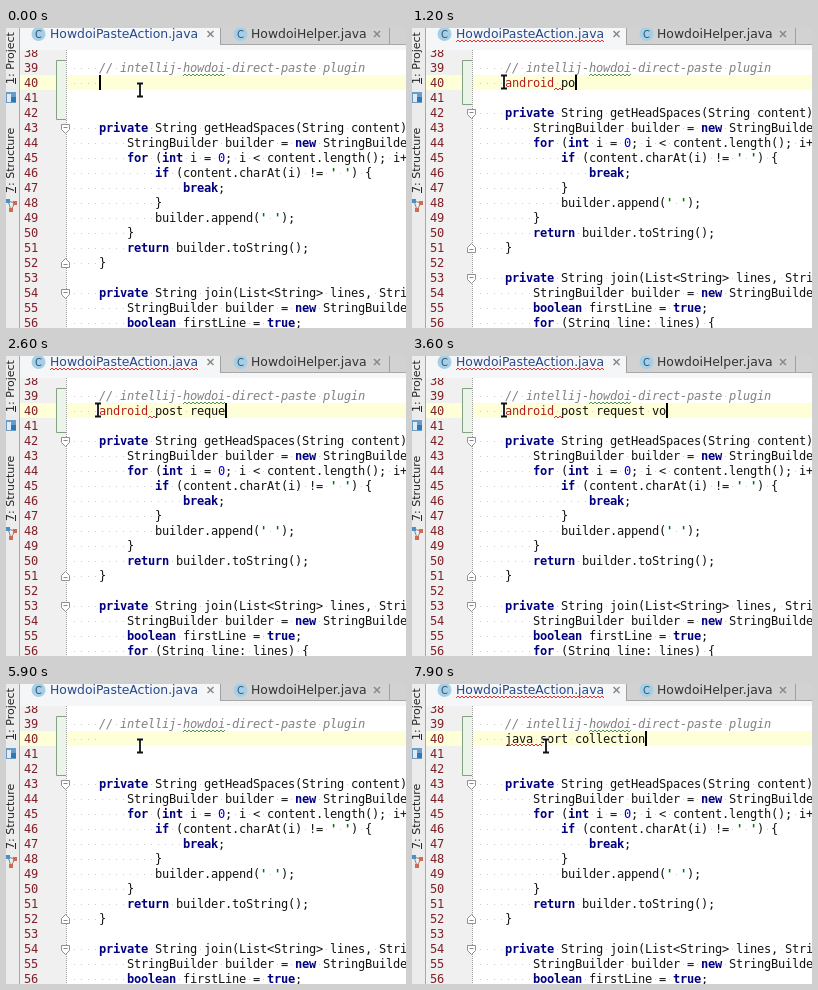
These frames come from a looping animation (400x300 px, 8 s). An HTML page with a canvas:

```html
<!DOCTYPE html>
<html lang="en">
<head>
<meta charset="utf-8">
<title>Editor paste demo</title>
<style>
html, body { margin: 0; width: 100%; height: 100%; overflow: hidden; background: #fff; }
canvas { display: block; }
</style>
</head>
<body>
<canvas id="stage" width="400" height="300"></canvas>
<script>
const ctx = document.getElementById('stage').getContext('2d');
const LOOP = 8000, LEFT = 65, CELL = 7, ROW = 15, FIRST = 38;
const MONO = '12px "DejaVu Sans Mono", monospace';
const SANS = '"DejaVu Sans", sans-serif';
const COMMENT = '    // intellij-howdoi-direct-paste plugin';

const methods = `    private String getHeadSpaces(String content) {
        StringBuilder builder = new StringBuilder();
        for (int i = 0; i < content.length(); i++) {
            if (content.charAt(i) != ' ') {
                break;
            }
            builder.append(' ');
        }
        return builder.toString();
    }

    private String join(List<String> lines, String glue) {
        StringBuilder builder = new StringBuilder();
        boolean firstLine = true;
        for (String line: lines) {`.split('\n');

const pasted = `    public class LoginRequest extends Request<String> {

        // ... other methods go here

        private Map<String, String> mParams;

        public LoginRequest(String param1, String param2) {
            super(Method.POST, "http://test.url", listener);
            mListener = listener;
            mParams.put("paramOne", param1);
            mParams.put("paramTwo", param2);

        }

        @Override
        public Map<String, String> getParams() {
            return mParams;`.split('\n');

const TOKEN = /\/\/.*|"[^"]*"|'[^']*'|\w+|[^\s\w"'\/]+|\S/g;
const KEYWORD = /^(private|public|class|extends|new|for|int|if|break|return|boolean|true|super)$/;

const colX = col => LEFT + col * CELL;
const rowMid = n => 25 + (n - FIRST) * ROW;

function box(x, y, w, h, color) {
  ctx.fillStyle = color;
  ctx.fillRect(x, y, w, h);
}

function label(text, x, y, color, font) {
  ctx.font = font;
  ctx.fillStyle = color;
  ctx.fillText(text, x, y);
}

function path(points, color, width = 1, fill) {
  ctx.beginPath();
  points.forEach(([x, y]) => ctx.lineTo(x, y));
  if (fill) { ctx.closePath(); ctx.fillStyle = fill; ctx.fill(); }
  ctx.strokeStyle = color;
  ctx.lineWidth = width;
  ctx.stroke();
}

function squiggle(x1, x2, y, color) {
  const points = [];
  for (let x = x1, i = 0; x <= x2; x += 2, i++) points.push([x, y + (i % 2 ? -1 : 1)]);
  path(points, color);
}

function mono(text, x, y, color, style = '') {
  ctx.letterSpacing = '-0.224px';
  label(text, x, y, color, style + MONO);
  ctx.letterSpacing = '0px';
}

function look(token) {
  if (token.startsWith('//')) return ['#808080', 'italic '];
  if (/^["']/.test(token)) return ['#007a00', 'bold '];
  if (KEYWORD.test(token)) return ['#000080', 'bold '];
  if (/^\d+$/.test(token)) return ['#0000d0'];
  if (token === 'android') return ['#b02020'];
  return ['#111'];
}

function codeLine(text, n) {
  const mid = rowMid(n);
  for (let i = 0; i < text.length; i++)
    if (text[i] === ' ') box(colX(i) + 3, mid, 1, 1, '#ccc');
  for (const m of text.matchAll(TOKEN))
    mono(m[0], colX(m.index), mid + 4, ...look(m[0]));
}

function foldMark(n, closing) {
  const y = rowMid(n) + .5, d = closing ? -1 : 1;
  path([[55.5, y - 4 * d], [63.5, y - 4 * d], [63.5, y + d], [59.5, y + 5 * d], [55.5, y + d], [55.5, y - 4 * d]],
    '#909090', 1, '#fff');
  path([[57.5, y - d], [61.5, y - d]], '#888');
}

function iBeam(x, y) {
  const shape = [[x - 3, y - 6.5], [x + 3, y - 6.5], [x, y - 6.5], [x, y + 6.5], [x - 3, y + 6.5], [x + 3, y + 6.5]];
  path(shape, '#fff', 4);
  path(shape, '#111', 1.8);
}

function cross(x) {
  path([[x - 3, 3], [x + 3, 9]], '#888', 1.5);
  path([[x + 3, 3], [x - 3, 9]], '#888', 1.5);
}

function classIcon(x) {
  ctx.beginPath();
  ctx.arc(x, 6, 7, 0, 7);
  ctx.fillStyle = '#a6cfe6';
  ctx.fill();
  label('C', x - 3.5, 10, '#2c5674', '10px ' + SANS);
}

function tabs(error) {
  box(14, 0, 386, 22, '#d2d2d2');
  box(14, 0, 200, 22, '#f4f6f8');
  box(214, 0, 1, 17, '#a0a0a0');
  box(383, 0, 1, 17, '#a0a0a0');
  box(214, 16, 186, 1, '#a8a8a8');
  box(14, 17, 386, 5, '#f4f6f8');
  const font = '12.4px ' + SANS;
  classIcon(32.5);
  label('HowdoiPasteAction.java', 44, 10, '#26488a', font);
  cross(204.5);
  classIcon(234.5);
  label('HowdoiHelper.java', 245, 10, '#333', font);
  cross(371);
  if (error) squiggle(44, 193, 13, '#e03030');
}

function sideLabel(text, bottom) {
  ctx.save();
  ctx.translate(8, bottom);
  ctx.rotate(-Math.PI / 2);
  label(text, 0, 0, '#222', '11px ' + SANS);
  box(0, 1, 6, 1, '#222');
  ctx.restore();
}

function sideBar() {
  box(0, 0, 13, 300, '#ececec');
  box(13, 0, 1, 300, '#a8a8a8');
  sideLabel('1: Project', 56);
  sideLabel('7: Structure', 165);
  box(0, 64, 10, 11, '#6a9cc8');
  box(1, 66, 4, 8, '#e4eaf0');
  box(5, 69, 5, 5, '#2c78b8');
  path([[2, 173], [9, 175], [5, 182], [2, 173]], '#888');
  for (const [x, y, color] of [[2, 173, '#4a90c4'], [9, 175, '#d06a50'], [5, 182, '#d06a50']])
    box(x - 2, y - 2, 4, 4, color);
}

// Number of typed characters, interpolated between [time, count] points.
function typed(points, t) {
  let count = 0;
  points.forEach(([t0, c0], i) => {
    if (t < t0) return;
    const [t1, c1] = points[i + 1] || [t0 + 1, c0];
    count = c0 + (c1 - c0) * Math.min(1, (t - t0) / (t1 - t0));
  });
  return Math.floor(count + .001);
}

const query1 = [[100, 0], [1200, 10], [2600, 18], [3600, 23], [4300, 27]];
const query2 = [[6000, 0], [7850, 20]];

function state(t) {
  if (t < 100) return { text: '', gap: 2, mouse: [134, 62], caret: true };
  if (t < 4500) {
    const text = 'android post request volley'.slice(0, typed(query1, t));
    return { text, gap: 1, mouse: [92, 54], caret: true, error: text.length > 2 };
  }
  if (t < 5300) return { pasted: true, mouse: [92, 54], caret: true, error: true, text: '' };
  const text = 'java sort collection'.slice(0, typed(query2, t));
  return { text, gap: 2, mouse: [134, 62], caret: t < 5800 || t >= 6000, error: text.length > 4 };
}

function draw(t) {
  const s = state(t);
  box(0, 0, 400, 300, '#fff');
  box(14, 17, 46, 283, '#f0f0f0');
  box(14, 47, 386, 15, '#ffffd7');

  const bottom = s.pasted ? 310 : rowMid(40 + s.gap) + 6;
  box(51, 33, 9, bottom - 33, '#eaf4e8');
  path([[60, 32.5], [50.5, 32.5], [50.5, bottom + .5], [60, bottom + .5]], '#86a086');
  for (let y = 20; y < 300; y += 2) box(60, y, 1, 1, '#999');

  for (let n = FIRST; n <= 56; n++) mono(n, 18, rowMid(n) + 4, '#802028');

  codeLine(COMMENT, 39);
  squiggle(177, 219, 47, '#4a9a4a');
  if (s.pasted) {
    pasted.forEach((line, i) => codeLine(line, 40 + i));
  } else {
    const start = 41 + s.gap;
    codeLine('    ' + s.text, 40);
    methods.forEach((line, i) => codeLine(line, start + i));
    foldMark(start, false);
    foldMark(start + 9, true);
    foldMark(start + 11, false);
    if (s.text.startsWith('android ')) squiggle(142, 150, 61, '#d03030');
    if (s.text.startsWith('java ')) squiggle(94, s.text.length > 5 ? 130 : 122, 61, '#d03030');
  }

  if (s.caret) box(93 + s.text.length * CELL, 47, 2, 15, '#000');
  iBeam(...s.mouse);
  tabs(s.error);
  sideBar();
}

function tick(now) {
  draw(now % LOOP);
  requestAnimationFrame(tick);
}
requestAnimationFrame(tick);
</script>
</body>
</html>
```
